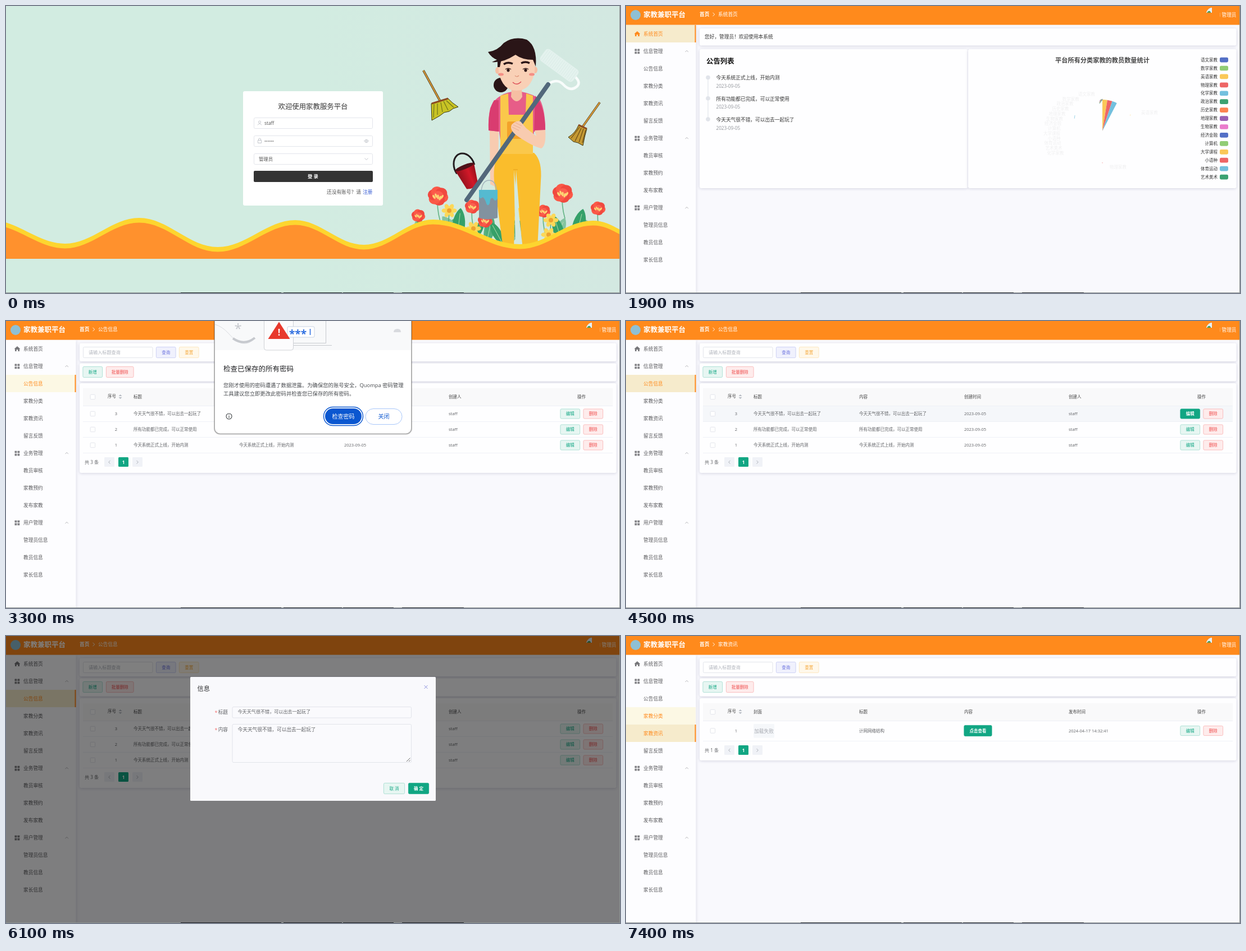
Recreate the animation shown at these times as an HTML page with a canvas. Size 1093x512 px, loop 8 s.

```html
<!DOCTYPE html>
<html lang="zh-CN">
<head>
<meta charset="utf-8">
<title>家教平台</title>
<style>
html, body { margin: 0; width: 100%; height: 100%; overflow: hidden; background: #fafafe; }
canvas { display: block; }
</style>
</head>
<body>
<canvas id="stage" width="1093" height="512"></canvas>
<script>
const ctx = document.getElementById('stage').getContext('2d');
const LOOP = 8000;
const FONT = '"Open Sans","Noto Sans CJK SC","Noto Sans CJK",sans-serif';
const ORANGE = '#ff8a1c', GREEN = '#11a683';
const USER = 'staff', BRAND = 'Quompa';

const clamp = v => Math.max(0, Math.min(1, v));
const span = (t, start, length) => clamp((t - start) / length);
const cubicInOut = p => p < .5 ? 4 * p ** 3 : 1 - 4 * (1 - p) ** 3;

// CSS "ease" curve, solved by bisection
function ease(x) {
  if (x <= 0 || x >= 1) return clamp(x);
  const bez = (u, a, b) => 3 * u * (1 - u) ** 2 * a + 3 * u * u * (1 - u) * b + u ** 3;
  let lo = 0, hi = 1;
  for (let i = 0; i < 20; i++) {
    const mid = (lo + hi) / 2;
    if (bez(mid, .25, .25) < x) lo = mid; else hi = mid;
  }
  return bez(lo, .1, 1);
}

function text(str, x, y, size = 8.7, color = '#555', align = 'left', weight = 400) {
  ctx.font = `${weight} ${size}px ${FONT}`;
  ctx.textAlign = align;
  ctx.textBaseline = 'alphabetic';
  ctx.fillStyle = color;
  ctx.fillText(str, x, y + size * .37);
}
function box(x, y, w, h, r, fill, stroke, lw = .8) {
  ctx.beginPath();
  ctx.roundRect(x, y, w, h, r);
  if (fill) { ctx.fillStyle = fill; ctx.fill(); }
  if (stroke) { ctx.strokeStyle = stroke; ctx.lineWidth = lw; ctx.stroke(); }
}
function shape(d, fill) {
  ctx.fillStyle = fill;
  ctx.fill(new Path2D(d));
}
function line(d, color, lw = 1) {
  ctx.strokeStyle = color;
  ctx.lineWidth = lw;
  ctx.stroke(new Path2D(d));
}
function oval(x, y, rx, ry, fill, rot = 0) {
  ctx.beginPath();
  ctx.ellipse(x, y, rx, ry, rot, 0, Math.PI * 2);
  ctx.fillStyle = fill;
  ctx.fill();
}
function layer(alpha, dy, draw) {
  if (alpha <= 0) return;
  ctx.save();
  ctx.globalAlpha = alpha;
  ctx.translate(0, dy);
  draw();
  ctx.restore();
}
function shadowed(blur, color, draw) {
  ctx.save();
  ctx.shadowBlur = blur;
  ctx.shadowColor = color;
  ctx.shadowOffsetY = 1;
  draw();
  ctx.restore();
}
const card = (x, y, w, h) => shadowed(5, 'rgba(60,60,110,.2)', () => box(x, y, w, h, 3, '#fefeff'));

/* ---------- login ---------- */

function wave(dy, color) {
  const bottom = 451;
  const pts = [[-28, 382], [105, 424], [237, 378], [377, 430], [515, 382], [637, 426], [760, 381], [915, 425], [1045, 383], [1150, 420]];
  ctx.beginPath();
  ctx.moveTo(pts[0][0], pts[0][1] + dy);
  for (let i = 1; i < pts.length; i++) {
    const [x0, y0] = pts[i - 1], [x1, y1] = pts[i], k = (x1 - x0) * .37;
    ctx.bezierCurveTo(x0 + k, y0 + dy, x1 - k, y1 + dy, x1, y1 + dy);
  }
  ctx.lineTo(1150, bottom);
  ctx.lineTo(-28, bottom);
  ctx.fillStyle = color;
  ctx.fill();
}
function redFlower(x, y, r) {
  line(`M${x} ${y}Q${x - 3} ${y + 20} ${x + 4} ${y + 45}`, '#62b384', 1.6);
  for (let i = 0; i < 6; i++) {
    const a = i * Math.PI / 3 + .3;
    oval(x + Math.cos(a) * r * .45, y + Math.sin(a) * r * .42, r * .58, r * .54, i % 2 ? '#f0493f' : '#fb5847');
  }
  oval(x, y, r * .55, r * .5, '#fb5f4f');
  for (let i = -2; i < 3; i++) oval(x + i * r * .2, y + r * (.08 + .12 * (i % 2)), r * .1, r * .22, '#fdd774', i * .3);
}
function yellowFlower(x, y) {
  line(`M${x} ${y}L${x - 2} ${y + 40}`, '#4da774', 1.4);
  for (let i = 0; i < 6; i++) {
    const a = i * Math.PI / 3;
    oval(x + Math.cos(a) * 8, y + Math.sin(a) * 7.500, 5.500, 3.800, '#fcd858', a);
  }
  oval(x, y, 4, 4, '#eda230');
}
function leaf(x, y, length, rot, color) {
  ctx.save();
  ctx.translate(x, y);
  ctx.rotate(rot);
  shape(`M0 0C${-length * .3} ${-length * .3} ${-length * .18} ${-length * .85} 0 ${-length}C${length * .18} ${-length * .85} ${length * .3} ${-length * .3} 0 0`, color);
  line(`M0 0L0 ${-length * .85}`, '#bfe3b4', .8);
  ctx.restore();
}
function garden() {
  ctx.save();
  ctx.beginPath();
  ctx.rect(720, 300, 360, 132);
  ctx.clip();
  for (let i = 0; i < 9; i++) leaf(735 + i * 40, 424, 50 + (i % 3) * 6, Math.sin(i * 2.2) * .7, i % 2 ? '#4fae7c' : '#83c4a0');
  [[802, 422, 62, .12], [822, 422, 48, .65], [884, 424, 44, -.5], [914, 425, 66, .12], [1012, 422, 62, .25], [1030, 420, 42, .8], [752, 408, 32, -.7], [990, 422, 50, -.3]]
    .forEach(l => leaf(...l, '#35a069'));
  [[769, 339, 18], [991, 334, 18], [830, 358, 13], [734, 374, 12], [1054, 361, 13], [853, 383, 13], [957, 366, 12]].forEach(f => redFlower(...f));
  [[789, 365], [908, 372], [970, 382], [930, 392], [832, 397], [966, 408]].forEach(f => yellowFlower(...f));
  ctx.restore();
}
function broom(stick, binding, head, bristles, tones) {
  line(stick, '#4a3a1c', 3.8);
  line(stick, '#d99a3a', 2.2);
  shape(head, tones[0]);
  line(bristles, tones[1], 1.2);
  line(head, '#3a3512', 1);
  line(binding, '#8b4a22', 3);
}
function worker() {
  // legs and far arm
  shape('M861 218L877 220L876 288Q878 314 870 322L862 318Z', '#f8cbb0');
  shape('M881 262L940 262Q955 276 952 312L946 433L919 433L908 292L904 433L885 433L869 312Q866 276 881 262', '#fabd2c');
  shape('M904 292L907 433L920 433Z', '#d2e8df');
  line('M903 292L911 292', '#eaa51c', 1.2);
  // shirt
  shape('M900 153Q872 158 862 182Q858 200 859 222L878 224L880 240L938 240L940 224L960 222Q960 186 951 168Q940 157 918 153Z', '#e75d88');
  shape('M869 168Q858 184 859 222L877 224L877 168Z', '#d93c70');
  shape('M942 160Q960 180 960 222L940 224Z', '#d93c70');
  // dungarees
  shape('M880 160L894 156L895 194L925 194L926 156L938 160L938 264L880 264Z', '#fac84b');
  shape('M895 157L925 157L924 190Q910 195 896 190Z', '#e75d88');
  shape('M900 148L918 148L919 162Q909 178 899 162Z', '#f6bfa3');
  box(892, 206, 27, 31, 3, '#f3a22b');
  // head
  oval(881, 141, 13, 13, '#2a1517');
  oval(875, 115, 4, 6, '#f6bfa3');
  oval(942, 114, 4, 6, '#f6bfa3');
  shape('M876 92Q909 72 942 92L941 118Q934 151 909 151Q884 151 877 118Z', '#f9d0b6');
  shape('M858 82Q875 80 886 66Q904 53 927 60Q946 72 943 108L938 96Q919 96 907 87Q884 102 865 100L874 96Q864 92 858 82Z', '#2a1517');
  shape('M875 96L882 94L879 109L875 109Z', '#2a1517');
  line('M886 104Q893 99 902 103M917 102Q925 98 932 102', '#2a1517', 3.4);
  for (const x of [894, 925]) {
    oval(x, 114.5, 2.6, 3, '#30191a');
    line(`M${x - 5} 113Q${x} 109 ${x + 5} 113`, '#30191a', 1.2);
  }
  oval(881, 122, 5, 2.5, '#f48f86');
  oval(936, 122, 5, 2.5, '#f48f86');
  line('M906 124Q909 128 913 124', '#dc9278', 1.2);
  line('M902 136Q909 143 917 135', '#dd4e57', 1.5);
}
function tools() {
  broom('M743 115L773 170', 'M758 174L787 165', 'M757 174L787 165Q794 173 805 180L796 183L789 188L780 190L772 196L758 204Z',
    'M762 175L761 199M768 174L768 194M774 172L777 189M779 170L787 186M784 169L797 181', ['#c8c324', '#6f741c']);
  broom('M1057 172L1026 216', 'M1019 212L1034 219', 'M1019 213L1034 219Q1030 232 1027 249L1018 244L1010 242L1001 234Q1014 226 1019 213Z',
    'M1021 216L1006 236M1024 218L1013 241M1028 219L1020 243M1032 221L1026 244', ['#c59a33', '#6a4a17']);
  // pails
  ctx.save();
  ctx.translate(817, 289);
  ctx.rotate(-.38);
  ctx.beginPath();
  ctx.ellipse(0, -3, 18, 24, 0, Math.PI * .9, Math.PI * 2.05);
  ctx.strokeStyle = '#231d20';
  ctx.lineWidth = 3;
  ctx.stroke();
  const red = ctx.createLinearGradient(-18, 0, 18, 0);
  red.addColorStop(0, '#8b101b');
  red.addColorStop(.6, '#d21828');
  red.addColorStop(1, '#92101a');
  shape('M-18 -2L18 -2L11 36Q0 41 -11 36Z', red);
  oval(0, -2, 18, 4, '#4e1118');
  ctx.restore();
  line('M846 330Q848 311 860 311Q872 311 873 330', '#a4b5bc', 1.5);
  shape('M842 328L875 328L875 378Q858 383 842 378Z', '#82929f');
  shape('M842 328L875 328L875 343Q871 351 867 343Q862 340 861 352Q857 360 854 349Q850 339 847 342Q844 345 842 340Z', '#55bad0');
  // roller
  ctx.lineCap = 'round';
  line('M967 138Q982 129 992 140Q1005 154 1017 143Q1023 136 1014 127', '#f8fcfb', 4.5);
  ctx.save();
  ctx.translate(985, 106);
  ctx.rotate(.63);
  box(-36, -13, 72, 26, 6, '#e4f2ee');
  for (let i = -8; i < 9; i++) line(`M${i * 4} -11L${i * 4} 11`, '#d8ebe5', .8);
  ctx.restore();
  line('M965 140L820 346', '#52687b', 8);
  ctx.lineCap = 'butt';
  // near arm
  shape('M941 222L960 221Q962 249 953 254Q938 251 909 231Q896 221 900 212Q908 203 916 206L926 218L944 232Z', '#f8cbb0');
  line('M901 216L913 222M903 212L916 218M907 208L918 214', '#e6a88c', .9);
}
function input(x, y, w, h = 20) { box(x + .5, y + .5, w - 1, h - 1, 2, '#fff', '#dcdfe6'); }

function login(t) {
  const mint = ctx.createLinearGradient(0, 0, 1093, 0);
  mint.addColorStop(.5, '#d2ece1');
  mint.addColorStop(1, '#d3e8e1');
  ctx.fillStyle = mint;
  ctx.fillRect(0, 0, 1093, 512);
  garden();
  worker();
  tools();
  wave(0, '#fdd52f');
  wave(8.5, '#ff912d');

  box(422, 152, 249, 204, 3, '#fff');
  text('欢迎使用家教服务平台', 546.5, 179.5, 12.4, '#333', 'center');
  [199, 231, 263].forEach(y => input(441, y, 212));
  text(USER, 460, 209, 8.4, '#555');
  text('••••••', 460, 241, 7.5, '#555');
  text('管理员', 450, 272.5, 8.4, '#555');
  line('M448 212.5Q451.500 207 455 212.5M449.500 207a2 2 0 1 0 4 0a2 2 0 1 0 -4 0', '#b4b8bf', .8);
  line('M448.500 239.500h6v5h-6zM449.500 239.500v-1.500a2 2 0 0 1 4 0v1.500', '#b4b8bf', .8);
  line('M637.500 241Q641.500 235.500 645.500 241Q641.500 246 637.500 241M640 241a1.500 1.500 0 1 0 3 0a1.500 1.500 0 1 0 -3 0', '#b4b8bf', .8);
  line('M638.500 271.500l3 3l3 -3', '#b4b8bf', .8);
  box(441, 294, 212, 20, 2, '#333');
  text('登 录', 546.5, 304, 8.4, '#fff', 'center', 600);
  text('还没有账号？请', 571, 331.5, 8.7, '#555');
  text('注册', 652.5, 331.5, 8.7, '#3157d2', 'right');

  const p = ease(span(t, 760, 340));
  layer(p, (p - 1) * 12, () => {
    box(428.5, 12.5, 236, 24.5, 2.5, '#f0f9eb', '#e1f3d8');
    oval(440, 24.8, 4.5, 4.5, '#67c23a');
    line('M437.8 24.8l1.6 1.7l2.9 -3', '#fff', 1);
    text('登录成功', 450, 24.8, 8.7, '#67c23a');
  });
}

/* ---------- shell ---------- */

const MENU = ['系统首页', '*信息管理', '公告信息', '家教分类', '家教资讯', '留言反馈', '*业务管理', '教员审核', '家教预约', '发布家教', '*用户管理', '管理员信息', '教员信息', '家长信息'];

function shell(active, hover) {
  ctx.fillStyle = '#f9f9fd';
  ctx.fillRect(0, 0, 1093, 512);
  shadowed(5, 'rgba(0,0,60,.12)', () => box(0, 34, 124.5, 478, 0, '#fdfdff'));
  MENU.forEach((item, i) => {
    const y = 49.5 + i * 31.03, group = item[0] === '*', on = item === active, over = item === hover;
    if (on || over) {
      ctx.fillStyle = over ? '#fcf8e4' : '#f6ebcc';
      ctx.fillRect(0, Math.round(y - 15.5), 124, 31);
    }
    if (on) {
      ctx.fillStyle = ORANGE;
      ctx.fillRect(122.5, Math.round(y - 15.5), 2, 31);
    }
    const color = on || over ? ORANGE : '#5c5c5f';
    text(group ? item.slice(1) : item, 31, y, 8.7, color);
    if (group) {
      for (const dx of [15.5, 20.5]) for (const dy of [-4, 1]) box(dx, y + dy, 3.8, 3.8, .4, '#808084');
      line(`M105.5 ${y + 1.5}l2.7 -2.7l2.7 2.7`, '#a0a0a5', .8);
    } else if (!i) {
      shape('M20 45L25 49.5L24 50.5V54H21.3V51H18.7V54H16V50.5L15 49.5Z', on ? ORANGE : '#77777b');
    }
  });
  ctx.fillStyle = ORANGE;
  ctx.fillRect(0, 0, 1093, 33.6);
  oval(17, 16, 9, 9, '#8fc0d4');
  text('家教兼职平台', 31, 15.5, 12.5, '#fff', 'left', 700);
  text('首页', 131, 15, 8.7, '#fff', 'left', 700);
  line('M154.5 11.8l3.2 3.2l-3.2 3.2', '#fff', .9);
  text(active, 164, 15, 8.7, '#fff');
  text('管理员', 1086.5, 15.5, 8.7, '#fff', 'right');
  ctx.save();
  ctx.beginPath();
  ctx.arc(1045, 15, 12.5, 0, 7);
  ctx.clip();
  box(1033, 3, 10, 9, 0, '#e6f0f8');
  shape('M1034 12Q1038 6 1041 11L1041 12Z', '#4f9b58');
  ctx.restore();
  line('M1057.5 12V19', '#ffb66e', .7);
}

/* ---------- home ---------- */

const SUBJECTS = ['语文家教', '数学家教', '英语家教', '物理家教', '化学家教', '政治家教', '历史家教', '地理家教', '生物家教', '经济金融', '计算机', '大学课程', '小语种', '体育运动', '艺术美术'];
const PALETTE = ['#5470c6', '#91cc75', '#fac858', '#ee6666', '#73c0de', '#3ba272', '#fc8452', '#9a60b4', '#ea7ccc'];
const PIE = { x: 848, y: 223, r: 56 };

function leader(index, [a, b, c], align, p) {
  const length = Math.hypot(b[0] - a[0], b[1] - a[1]) + Math.hypot(c[0] - b[0], c[1] - b[1]);
  ctx.save();
  ctx.setLineDash([p * length, 999]);
  line(`M${a}L${b}L${c}`, PALETTE[index % 9], .7);
  ctx.restore();
  const gap = align === 'left' ? 2 : -2;
  layer(p, 0, () => text(SUBJECTS[index], c[0] + gap, c[1], 7.5, '#444', align));
}
function pie(p) {
  if (p <= 0) return;
  const slice = p * Math.PI * 2 / 3;
  for (let i = 0; i < 3; i++) {
    const a = -Math.PI / 2 + i * slice;
    ctx.beginPath();
    ctx.moveTo(PIE.x, PIE.y);
    ctx.arc(PIE.x, PIE.y, PIE.r, a, a + slice);
    ctx.fillStyle = PALETTE[i + 2];
    ctx.fill();
  }
  leader(2, [[897, 195], [906, 190], [915, 190]], 'left', p);
  leader(3, [[848, 279], [849, 287], [859, 287]], 'left', p);
  [0, 1, 5, 6, 7, 8, 9, 10, 11, 12, 13, 14, 4].forEach((index, i) => {
    const d = Math.abs(8 - i), y = 157 + i * 8.75;
    const x = i === 0 ? 835 : i < 8 ? 773 + d * d * .45 + d ** 3 * .034 : 773 + d * d * .4;
    leader(index, [index === 4 ? [799, 195] : [848, 167], [x + 11, y], [x + 2, y]], 'right', p);
  });
}
function home(t) {
  card(131, 40, 955.5, 30.5);
  text('您好，管理员！欢迎使用本系统', 140, 55, 8.7, '#333');
  card(131, 77, 477.5, 248);
  card(609, 77, 477.5, 248);
  text('公告列表', 143, 98, 12.4, '#111', 'left', 700);
  line('M146 127V202', '#e4e7ed', 1.3);
  ['今天系统正式上线，开始内测', '所有功能都已完成，可以正常使用', '今天天气很不错，可以出去一起玩了'].forEach((s, i) => {
    const y = 127.5 + i * 37.3;
    oval(146, y, 3.8, 3.8, '#e1e4ea');
    text(s, 160.5, y + .5, 8.7, '#333');
    text('2023-09-05', 160.5, y + 15.5, 8.2, '#909399');
  });
  text('平台所有分类家教的教员数量统计', 848, 97, 11.2, '#464646', 'center', 700);
  SUBJECTS.forEach((s, i) => {
    const y = 96 + i * 14.93;
    text(s, 1053, y, 7.5, '#333', 'right');
    box(1057, y - 4.3, 15, 8.7, 2.4, PALETTE[i % 9]);
  });
  pie(cubicInOut(span(t, 1634, 1000)));
}

/* ---------- tables ---------- */

const TONES = {
  green: ['#e7f6f2', '#9fdbcd', GREEN],
  red: ['#feecec', '#f9b0b0', '#ef4b4b'],
  blue: ['#f0f1fd', '#c3c8f3', '#656cdd'],
  amber: ['#fff8ea', '#fde2b2', '#f5a93c'],
  solid: [GREEN, GREEN, '#fff'],
  plain: ['#fbfbfd', '#dcdfe6', '#606266']
};
function button(label, x, y, w, h, tone, size = 7.5) {
  const [bg, edge, ink] = TONES[tone];
  box(x + .4, y + .4, w - .8, h - .8, 2, bg, edge);
  text(label, x + w / 2, y + h / 2, size, ink, 'center', tone === 'solid' ? 600 : 400);
}
function rule(y) { line(`M137 ${y}H1080`, '#ebeef5', .8); }
function checkbox(y) { box(150.2, y - 4.2, 8.4, 8.4, 1.2, '#fff', '#dcdfe6'); }

function listFrame(bottom, heads, count, pagerY) {
  card(131, 39.5, 955.5, 32.5);
  card(131, 75.5, 955.5, 32);
  card(131, 111, 955.5, bottom - 111);
  input(137, 46, 124.5);
  text('请输入标题查询', 147, 56, 8.1, '#b0b4bc');
  button('查询', 267, 46, 35.5, 20, 'blue');
  button('重置', 308, 46, 35.5, 20, 'amber');
  button('新增', 136.5, 81, 35.5, 20, 'green');
  button('批量删除', 178, 81, 49.5, 20, 'red');
  ctx.fillStyle = '#f9f9fa';
  ctx.fillRect(137, 120, 943, 31.5);
  rule(151.5);
  checkbox(135.5);
  text('序号', 181, 134.5, 7.5, '#444', 'left', 500);
  shape('M200.5 134L203.5 131L206.5 134ZM200.5 136L203.5 139L206.5 136Z', '#b6bac2');
  heads.forEach((s, i) => text(s, [227, 415, 602, 788][i], 135.5, 7.5, '#444', 'left', 500));
  text('操作', 1024.5, 135.5, 7.5, '#444', 'center', 500);
  text(`共 ${count} 条`, 140, pagerY, 8.1, '#606266');
  [175, 200, 225].forEach((x, i) => box(x, pagerY - 9, 18, 17, 1.5, i === 1 ? GREEN : '#f0f2f7'));
  text('1', 209, pagerY, 8.1, '#fff', 'center', 700);
  line(`M185.5 ${pagerY - 3}l-2.8 2.8l2.8 2.8M232.5 ${pagerY - 3}l2.8 2.8l-2.8 2.8`, '#a2a6ae', .9);
}
function rowActions(y, hot) {
  button('编辑', 986.5, y - 9, 35.5, 18, hot ? 'solid' : 'green');
  button('删除', 1027.5, y - 9, 35.5, 18, 'red');
}
function notices(t) {
  const hot = t >= 4150 && t < 6100;
  listFrame(271, ['标题', '内容', '创建时间', '创建人'], 3, 252);
  ['今天天气很不错，可以出去一起玩了', '所有功能都已完成，可以正常使用', '今天系统正式上线，开始内测'].forEach((s, i) => {
    const y = 165.5 + i * 28;
    if (hot && !i) {
      ctx.fillStyle = '#f5f7fa';
      ctx.fillRect(137, 152, 943, 27.5);
    }
    checkbox(y);
    text(3 - i, 196, y, 7.5, '#606266', 'center');
    text(s, 227, y, 7.5, '#606266');
    text(s, 415, y, 7.5, '#606266');
    text('2023-09-05', 602, y, 7.5, '#606266');
    text(USER, 788, y, 7.5, '#606266');
    rowActions(y, hot && !i);
    rule(y + 14);
  });
}
function articles() {
  listFrame(222, ['封面', '标题', '内容', '发布时间'], 1, 204);
  checkbox(169);
  text('1', 196, 169, 7.5, '#606266', 'center');
  box(227, 157, 37, 24.5, 1, '#f5f7fa');
  text('加载失败', 245.5, 169.5, 8.7, '#a8abb2', 'center');
  text('计网网络结构', 415, 169, 7.5, '#606266');
  button('点击查看', 601.5, 159, 50, 20, 'solid');
  text('2024-04-17 14:32:41', 788, 169, 7.5, '#606266');
  rowActions(169, false);
  rule(187.5);
}

/* ---------- dialogs ---------- */

function passwordAlert() {
  box(371, -20, 351, 221.5, 10, '#fff', 'rgba(0,0,0,.3)', 2);
  box(372, -20, 349, 72, 0, '#f8f9fa');
  line('M372 6Q385 10 396 22Q422 53 443 31', '#dadce0', 1);
  line('M404 31Q424 45 443 30', '#c6c9ce', 4);
  text('*', 413, 13, 24, '#c4c7cc', 'center');
  line('M569.5 0V39.5H511M511 43.5H580', '#c6c9ce', 1);
  box(459.5, -12, 52, 64, 4, '#fcfcfd', '#cfd2d6', 1);
  box(501, 10, 48, 19, 2, '#fff', '#c9d3e2', 1);
  text('***', 504, 23, 19, '#2f6fe0', 'left', 700);
  line('M541.5 14V25', '#2f6fe0', 1.6);
  shape('M486 1.5L505.5 32H466.5Z', '#e8392d');
  text('!', 486, 20, 16, '#fff', 'center', 700);
  shape('M690 20Q690 14 697 14Q703 14 703 20Z', '#d8dade');
  text('检查已保存的所有密码', 387, 85, 12.5, '#202124');
  text(`您刚才使用的密码遭遇了数据泄露。为确保您的账号安全，${BRAND} 密码管理`, 387, 115, 9.33, '#474a4e');
  text('工具建议您立即更改此密码并检查您已保存的所有密码。', 387, 130, 9.33, '#474a4e');
  line('M392 170a5 5 0 1 0 10 0a5 5 0 1 0 -10 0M397 169.2V173M397 166.8V168', '#3c4043', 1.1);
  box(565.5, 153.5, 70, 33, 16.5, '#fff', '#0b57d0', 1.4);
  box(568, 156, 65, 28, 14, '#0b57d0');
  text('检查密码', 600.5, 170.5, 10, '#fff', 'center', 500);
  box(640, 156.5, 65, 28, 14, '#fff', '#a8c7fa', 1);
  text('关闭', 672.5, 170.5, 10, '#0b57d0', 'center', 500);
}
function editDialog(cancelHot) {
  box(328, 73, 437, 221, 1.5, '#f9f9fc');
  text('信息', 340.5, 93.5, 11.2, '#303133');
  line('M744.5 88l6 6M750.5 88l-6 6', '#7f86d8', .9);
  [['标题', 135.5], ['内容', 167]].forEach(([s, y]) => {
    text('*', 371.5, y + 1, 8.7, '#f56c6c');
    text(s, 395, y, 8.7, '#606266', 'right');
  });
  box(403, 126.5, 318.5, 19.5, 2, '#fafafd', '#dcdfe6');
  box(403, 157.5, 318.5, 68, 2, '#fafafd', '#dcdfe6');
  text('今天天气很不错，可以出去一起玩了', 412.5, 135.5, 8.1, '#606266');
  text('今天天气很不错，可以出去一起玩了', 412.5, 167, 8.7, '#606266');
  line('M713 224l6.5 -6.5M717 224l2.5 -2.5', '#444', .8);
  button('取 消', 672, 262, 38, 20, cancelHot ? 'green' : 'plain');
  button('确 定', 716, 262, 37, 20, 'solid');
}
function editLayer(t) {
  const opened = 4550, closed = 6150;
  if (t < opened) return;
  const closing = t >= closed, start = closing ? closed : opened;
  const visible = ms => {
    const p = ease(span(t, start, ms));
    return closing ? 1 - p : p;
  };
  layer(visible(200), 0, () => {
    ctx.fillStyle = 'rgba(0,0,0,.5)';
    ctx.fillRect(0, 0, 1093, 512);
  });
  const v = visible(300);
  layer(v, (v - 1) * 12.4, () => editDialog(t >= 5600 && !closing));
}

/* ---------- timeline ---------- */

function windowEdge() {
  ctx.fillStyle = '#8c9291';
  ctx.fillRect(1092, 0, 1, 512);
  ctx.fillRect(0, 511, 1093, 1);
  ctx.fillStyle = '#1b2025';
  [[311, 179], [494, 104], [600, 90], [705, 110]].forEach(([x, w]) => ctx.fillRect(x, 511, w, 1));
}
function draw(t) {
  if (t < 1500) {
    login(t);
  } else if (t < 2500) {
    shell('系统首页', t >= 2400 ? '公告信息' : '');
    home(t);
  } else if (t < 7000) {
    shell('公告信息', t < 4100 ? '公告信息' : t >= 6700 ? '家教分类' : '');
    notices(t);
    if (t < 4100) layer(ease(span(t, 3050, 250)), 0, passwordAlert);
    editLayer(t);
  } else {
    shell('家教资讯', '家教分类');
    articles();
  }
  windowEdge();
}
const origin = performance.now();
function tick() {
  draw((performance.now() - origin) % LOOP);
  requestAnimationFrame(tick);
}
tick();
</script>
</body>
</html>
```
